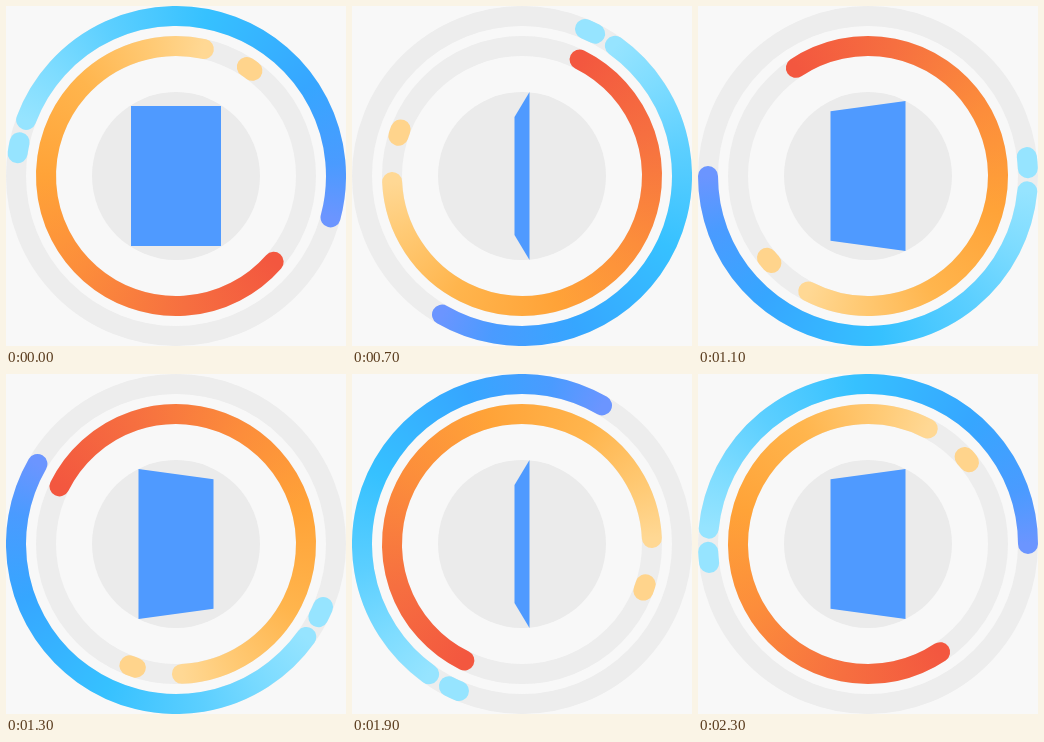
These frames come from a looping animation (340 px wide and 340 px high, 2400 ms). An HTML page with a canvas:

```html
<!DOCTYPE html>
<html lang="en">
<head>
<meta charset="utf-8">
<title>Counter-rotating rings</title>
<style>
  html, body { margin: 0; width: 100%; height: 100%; overflow: hidden; background: #f8f8f8; }
  canvas { display: block; }
</style>
</head>
<body>
<canvas width="340" height="340"></canvas>
<script>
const ctx = document.querySelector('canvas').getContext('2d');
const C = 170, LOOP = 2400, STEP = 100;
const rad = deg => deg * Math.PI / 180;

// Colour stops are [degrees after the start of the arc, colour].
const BLUE = [[0, '#96e4ff'], [20, '#7edcff'], [45, '#5ccfff'], [80, '#36c1ff'],
  [125, '#36a6ff'], [155, '#4a9bff'], [174.5, '#6b95ff']];
const ORANGE = [[0, '#f3573f'], [45, '#f66f40'], [94, '#fc8d3b'], [139, '#ffa338'],
  [184, '#ffb54d'], [220, '#ffcb77'], [241, '#ffd894']];

function disc(r, color) {
  ctx.fillStyle = color;
  ctx.beginPath();
  ctx.arc(C, C, r, 0, 2 * Math.PI);
  ctx.fill();
}

function arc(r, from, span, color) {
  ctx.strokeStyle = color;
  ctx.beginPath();
  ctx.arc(C, C, r, rad(from), rad(from + span));
  ctx.stroke();
}

function gradientArc(r, from, span, stops) {
  const lead = 10; // room for the round cap before the start
  const gradient = ctx.createConicGradient(rad(from - lead), C, C);
  for (const [deg, color] of stops) gradient.addColorStop((deg + lead) / 360, color);
  arc(r, from, span, gradient);
}

function flippingCard(t) {
  const phase = t % 1200 / 600;
  const turn = phase < 1 ? phase : 2 - phase;
  const side = phase < 1 ? -1 : 1; // side of the near edge
  const x = side * 45 * (1 - turn);
  const near = 70 + 14.1 * (1 - (1 - turn) ** 2.4);
  const far = 70 - 11 * (1 - (1 - turn) ** 3.5);
  ctx.fillStyle = '#4f9aff';
  ctx.beginPath();
  ctx.moveTo(C + x, C - near);
  ctx.lineTo(C - x, C - far);
  ctx.lineTo(C - x, C + far);
  ctx.lineTo(C + x, C + near);
  ctx.fill();
}

function draw(now) {
  const t = Math.floor(now % LOOP / STEP) * STEP;
  const spin = 360 * t / LOOP;

  ctx.fillStyle = '#f8f8f8';
  ctx.fillRect(0, 0, 340, 340);
  ctx.lineWidth = 20;
  ctx.lineCap = 'round';
  arc(160, 0, 360, '#ededed');
  arc(130, 0, 360, '#ededed');
  disc(84, '#ebebeb');

  gradientArc(160, 200.5 + spin, 174.5, BLUE);
  arc(160, 188.2 + spin, 4, '#96e4ff');
  gradientArc(130, 41.3 - spin, 241.1, ORANGE);
  arc(130, 303 - spin, 3, '#ffd48c');

  flippingCard(t);
  requestAnimationFrame(draw);
}

draw(performance.now());
</script>
</body>
</html>
```
